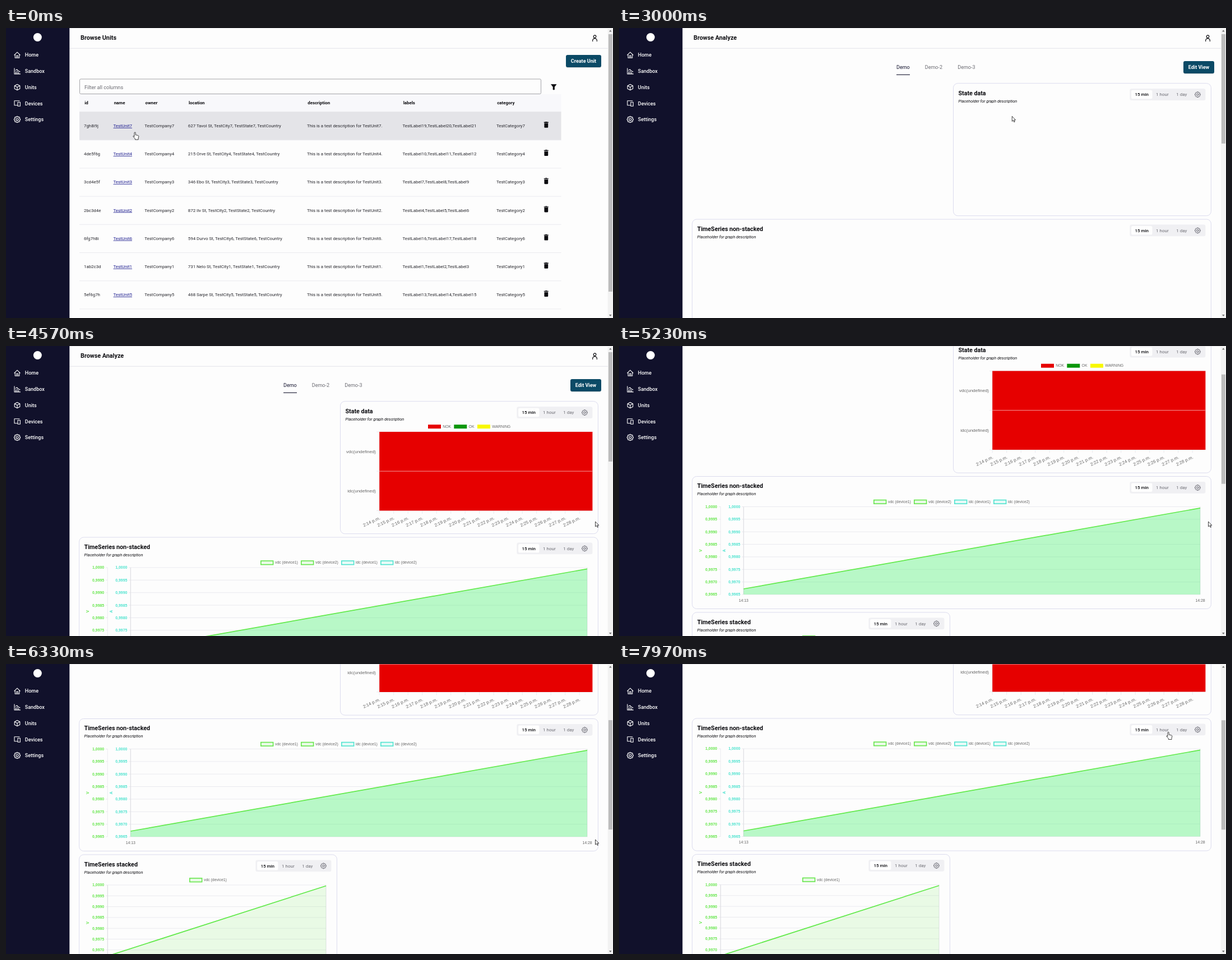
Recreate the animation shown at these times as an HTML page. Size 1083 by 517 pixels, loop 8000 ms.

```html
<!DOCTYPE html>
<html lang="en">
<head>
<meta charset="utf-8">
<title>Unit dashboard</title>
<style>
html, body { margin: 0; width: 100%; height: 100%; overflow: hidden; background: #fdfdfd; }
svg { display: block; width: 100vw; height: 100vh; font-family: Roboto, sans-serif; }
.chart { font-family: "Liberation Sans", Arial, sans-serif; }
</style>
</head>
<body>
<svg id="stage" viewBox="0 0 1083 517"></svg>
<script>
const INK = '#0c0c10', NAVY = '#11112b', GRAY = '#6b6b72', RULE = '#e2e2ea', EDGE = '#d3d4ea';
const GREEN = '#66e64c', TEAL = '#4fe3cf', LOOP = 8000;
const range = n => [...Array(n).keys()];

// y is the vertical middle of the capitals
const text = (x, y, str, size = 9, attrs = '') =>
  `<text x="${x}" y="${(y + size * .356).toFixed(2)}" font-size="${size}" ${attrs}>${str}</text>`;
const bold = (x, y, str, size = 10.8) => text(x, y, str, size, `font-weight="700" fill="${INK}"`);
const rect = (x, y, x2, y2, fill, attrs = '') =>
  `<rect x="${x}" y="${y}" width="${x2 - x}" height="${y2 - y}" fill="${fill}" ${attrs}/>`;
const line = (x, y, x2, y2, color = RULE, w = .7) =>
  `<path d="M${x} ${y}L${x2} ${y2}" stroke="${color}" stroke-width="${w}"/>`;
const icon = (x, y, d, color, w = 1.2) =>
  `<path transform="translate(${x} ${y})" d="${d}" fill="none" stroke="${color}" stroke-width="${w}" stroke-linejoin="round" stroke-linecap="round"/>`;
const card = (x, y, x2, y2) => rect(x, y, x2, y2, 'none', `rx="8" stroke="${EDGE}" stroke-width=".8"`);
const button = (x, y, x2, y2, str, fill) =>
  rect(x, y + .8, x2, y2 + 1, '#000', 'rx="3.5" opacity=".15"') + rect(x, y, x2, y2, fill, 'rx="3"') +
  text((x + x2) / 2, (y + y2) / 2, str, 9, 'font-weight="700" fill="#fff" text-anchor="middle"');

function gear(x, y, r, color, w) {
  const pts = range(8).flatMap(i => [[-.3, .78], [-.19, 1], [.19, 1], [.3, .78]].map(([a, k]) => {
    const t = i * Math.PI / 4 + a;
    return `${(Math.cos(t) * r * k).toFixed(2)} ${(Math.sin(t) * r * k).toFixed(2)}`;
  }));
  const c = r * .36;
  return icon(x, y, `M${pts.join('L')}ZM${c} 0A${c} ${c} 0 1 1 ${-c} 0A${c} ${c} 0 1 1 ${c} 0`, color, w);
}

function header(title, userX) {
  return bold(133, 17.5, title) + line(113, 36.3, 1083, 36.3, '#dfdfe6', .8) +
    icon(userX, 18, 'M-2.3 -2.8a2.3 2.3 0 1 1 4.6 0a2.3 2.3 0 1 1 -4.6 0M-3.8 5.6V4.2A3.8 3.6 0 0 1 3.8 4.2V5.6', INK);
}

function sidebar() {
  const items = [
    ['Home', 'M-5.2 0L0 -5L5.2 0M-3.8 -1V5H3.8V-1M-1.2 5V1.2H1.2V5'],
    ['Sandbox', 'M-5 -5V5H5.5M-2.5 5V1M0 5V0M2.5 5V2M-3 -1.5L-.5 -3L2 -.5L5 1'],
    ['Units', 'M0 -5.2L4.8 -2.6V2.6L0 5.2L-4.8 2.6V-2.6ZM-4.8 -2.6L0 0L4.8 -2.6M0 0V5.2'],
    ['Devices', 'M4 -4.5H-5V3.5H0M1 -2H5.3V5H1Z'],
    ['Settings']
  ];
  return rect(0, 0, 113.3, 517, NAVY) + '<circle cx="56.3" cy="16.5" r="7.5" fill="#fff"/>' +
    items.map(([name, d], i) => {
      const y = 48.2 + i * 28.7;
      return (d ? icon(20, y, d, '#fff', 1.1) : gear(20, y, 5.6, '#fff', 1.1)) +
        text(33.8, y, name, 9, 'font-weight="500" fill="#fff"');
    }).join('');
}

function browsePage() {
  const cols = [[139, 'id'], [191.5, 'name'], [247.3, 'owner'], [324.8, 'location'],
    [537, 'description'], [707.5, 'labels'], [875, 'category']];
  const rows = [
    [7, '7gh8i9j', '627 Tavol St'], [4, '4de5f6g', '215 Orve St'], [3, '3cd4e5f', '346 Ebo St'],
    [2, '2bc3d4e', '872 Ilv St'], [6, '6fg7h8i', '594 Durvo St'], [1, '1ab2c3d', '731 Nelo St'],
    [5, '5ef6g7h', '468 Sarpe St']];
  const labels = n => [2, 1, 0].map(k => 'TestLabel' + (n * 3 - k)).join(',');
  const row = ([n, id, street], i) => {
    const y = 149.5 + i * 50.2, mid = y + 24.6;
    const cells = [id, 'TestUnit' + n, 'TestCompany' + n,
      `${street}, TestCity${n}, TestState${n}, TestCountry`,
      `This is a test description for TestUnit${n}.`, labels(n), 'TestCategory' + n];
    return (i ? '' : rect(131, y, 990.5, y + 50, '#e4e4e8')) + line(131, y + 50.2, 990.5, y + 50.2) +
      cells.map((c, k) => text(cols[k][0], mid, c, 7.87,
        k === 1 ? 'fill="#1b1b8e" text-decoration="underline"' : 'fill="#26262c"')).join('') +
      `<path transform="translate(963.8 ${mid - 1.7})" d="M-4 -4.8H-2L-1.3 -5.5H1.3L2 -4.8H4V-3.5H-4ZM-3.4 -2.9H3.4V4.3Q3.4 5.4 2.3 5.4H-2.3Q-3.4 5.4 -3.4 4.3Z" fill="${INK}"/>`;
  };
  return header('Browse Units', 1050.5) + button(999, 48, 1062, 70, 'Create Unit', '#0b4a66') +
    rect(131.5, 91, 954.5, 117.5, '#fdfdfd', 'rx="2" stroke="#8d8d94" stroke-width=".8"') +
    text(140, 105.8, 'Filter all columns', 9.1, `fill="${GRAY}"`) +
    `<path d="M972.5 100.5H982L978.6 105V110H976V105Z" fill="${INK}" stroke="${INK}" stroke-linejoin="round" stroke-width=".6"/>` +
    rect(131, 118, 990.5, 149.5, '#f8f8fb') + line(131, 149.5, 990.5, 149.5) +
    cols.map(([x, name]) => text(x + 1.2, 132.8, name, 7.9, `font-weight="600" fill="${INK}"`)).join('') +
    rows.map(row).join('');
}

function detailsPage() {
  const section = (y, name) => bold(145, y, name) + line(145, y + 11, 581, y + 11);
  const field = (x, y, name, value) =>
    rect(x, y, x + 214, y + 39.2, 'none', `rx="2" stroke="${RULE}" stroke-width=".8"`) +
    bold(x + 5.3, y + 11.4, name, 9) + text(x + 5.3, y + 27, value, 9, 'fill="#1d1d22"');
  const link = (y, str) => text(613.4, y, str, 9, 'fill="#4763a6"');
  return header('Unit Details', 1060.3) + gear(151, 74, 6.8, INK, 1.3) +
    card(134, 96, 592, 468.3) + bold(142.8, 112.8, 'Unit Metadata') +
    section(140.5, 'Unit Information') +
    field(145.2, 159, 'Unit Name', 'TestUnit7') + field(366.3, 159, 'Unit ID', '7gh8i9j') +
    field(145.2, 205.2, 'Owner', 'TestCompany7') +
    field(366.3, 205.2, 'Description', 'This is a test description for TestUnit7.') +
    field(145.2, 251.4, 'Category', 'TestCategory7') +
    section(316.3, 'Location') +
    field(145.2, 334.4, 'Location', '627 Tavol St, TestCity7, TestState7, TestCountry') +
    section(399.3, 'Labels') + field(145.2, 417.6, 'Labels', 'TestLabel19,TestLabel20,TestLabel21') +
    card(604, 96, 1062.3, 230) + bold(613, 112.8, 'Views') +
    button(626, 130.7, 668.2, 153, 'Demo', NAVY) +
    button(622, 160, 672.4, 182.3, 'Demo-2', NAVY) + button(622, 189.2, 672.4, 211.5, 'Demo-3', NAVY) +
    card(604, 251, 1062.3, 313) + bold(613, 268, 'Devices') +
    link(283, 'device1 (ID: iBX4WfJxhoyk7JGBFPEi)') + link(296.5, 'device2 (ID: iBX4WfJxhoyk7JGBFPEb)');
}

function chartCard(x, y, x2, title) {
  const r = x2 - 10, tab = (dx, str, c) => text(r - dx, y + 19.8, str, 8, `text-anchor="middle" ${c}`);
  return card(x, y, x2, y + 236) + bold(x + 9, y + 17, title, 10.7) +
    text(x + 9, y + 31.2, 'Placeholder for graph description', 7.3, `font-style="italic" fill="${INK}"`) +
    rect(r - 135, y + 9.5, r, y + 30.3, '#f0f0f3', 'rx="3"') +
    rect(r - 132.3, y + 12, r - 95, y + 27.5, '#fefefe', 'rx="2.5"') +
    tab(113.7, '15 min', `font-weight="500" fill="${INK}"`) +
    tab(77, '1 hour', `fill="${GRAY}"`) + tab(42.7, '1 day', `fill="${GRAY}"`) +
    gear(r - 14, y + 20, 4.9, '#55555f', .9);
}

const legendText = (x, y, str) => text(x, y, str, 6.87, 'fill="#666"');
const legendBox = (x, y, color, str) =>
  rect(x + .8, y - 2.9, x + 22.6, y + 3.7, color, `fill-opacity=".13" stroke="${color}" stroke-width="1.6"`) +
  legendText(x + 26, y, str);

function statePlot() {
  const top = 153, ticks = range(15).map(i => 666.2 + i * 25.5);
  return [[753, '#e60000', 'NOK'], [799.3, '#0b960b', 'OK'], [841, '#f8f800', 'WARNING']]
    .map(([x, c, s]) => rect(x, 140.2, x + 23, 147.2, c) + legendText(x + 26.3, 143.5, s)).join('') +
    ticks.map(x => line(x, top, x, 299)).join('') +
    [153, 223.2, 293.5].map(y => line(661, y, 1046.5, y)).join('') +
    ['vdc', 'idc'].map((s, i) => text(660, 188 + i * 70.3, s + '(undefined)', 8, 'fill="#666" text-anchor="end"')).join('') +
    ticks.map((x, i) => `<text transform="translate(${x + 2} 308.5) rotate(-25)" font-size="7.9" fill="#666" text-anchor="end">2:${14 + i} p.m.</text>`).join('') +
    `<rect id="bars" x="666.2" y="${top}" fill="#e60000"/><path id="gap" stroke="#f6c4c4" stroke-width=".8"/>`;
}

function axis(right, top, step, color, unit, unitX) {
  const mid = top + step * 3.5;
  return range(8).map(i => text(right, top + i * step, (1 - i * .0005).toFixed(4).replace('.', ','), 6.9,
    `font-weight="700" fill="${color}" text-anchor="end"`) +
    line(right + 2.5, top + i * step, right + 6, top + i * step)).join('') +
    line(right + 6, top, right + 6, top + step * 7) +
    `<text transform="translate(${unitX} ${mid}) rotate(-90)" font-size="6.9" font-weight="700" fill="${color}" text-anchor="middle">${unit}</text>`;
}

const grid = (x, x2, top, step) => range(8).map(i => line(x, top + i * step, x2, top + i * step)).join('') +
  [x, x2].map(v => line(v, top, v, top + step * 7, '#d6d6dc')).join('');
const times = (x, x2, y) => [[x, '14:13'], [x2, '14:28']]
  .map(([v, s]) => text(v, y, s, 6.9, 'fill="#666" text-anchor="middle"')).join('');
const series = (id, fill) =>
  `<path id="${id}Fill" fill="${fill}"/><path id="${id}Line" fill="none" stroke="#62ea4b" stroke-width="1.7"/>`;

function analyzePage() {
  const tabs = [[495, 'Demo', '#14142e'], [545.8, 'Demo-2', GRAY], [604.3, 'Demo-3', GRAY]];
  const names = ['vdc (device1)', 'vdc (device2)', 'idc (device1)', 'idc (device2)'];
  return header('Browse Analyze', 1050.5) + button(1007, 59, 1062, 81, 'Edit View', '#0b4a66') +
    tabs.map(([x, s, c]) => text(x, 70, s, 9, `fill="${c}"`)).join('') + line(495, 83.3, 519, 83.3, NAVY, 1.1) +
    chartCard(596.5, 98.7, 1056.4, 'State data') +
    chartCard(130.6, 341, 1056.4, 'TimeSeries non-stacked') +
    chartCard(130.6, 583.4, 590.4, 'TimeSeries stacked') +
    `<g id="plots" class="chart">` + statePlot() +
    [454, 526, 598, 668].map((x, i) => legendBox(x, 386, i < 2 ? GREEN : TEAL, names[i])).join('') +
    axis(175.2, 395, 22.36, GREEN, 'V', 148) + axis(216.3, 395, 22.36, TEAL, 'A', 189.5) +
    grid(222.3, 1037, 395, 22.36) + times(222.3, 1037, 561.6) + series('wide', 'rgba(72,240,110,.38)') +
    legendBox(327, 628.3, GREEN, names[0]) + axis(175.2, 637.5, 19.3, GREEN, 'V', 148) +
    grid(181.3, 571, 637.5, 19.3) + times(181.3, 571, 783) + series('half', 'rgba(100,230,70,.13)') + '</g>';
}

const scrollbar = () => rect(1073.7, 0, 1083, 517, '#f2f2f2') +
  '<path d="M1076 6.5L1078.3 3.5L1080.6 6.5ZM1076 511L1078.3 514L1080.6 511Z" fill="#6e6e6e"/>' +
  '<rect id="thumb" x="1074.9" width="7" fill="#bcbcbc"/>';

document.getElementById('stage').innerHTML = rect(0, 0, 1083, 517, '#fdfdfd') +
  `<g id="browse">${browsePage()}</g><g id="details">${detailsPage()}</g><g id="analyze">${analyzePage()}</g>` +
  line(113, .3, 1083, .3, '#d4d4d8') + sidebar() + `<g id="bar">${scrollbar()}</g>` +
  '<g id="pointer" stroke="#111" stroke-width=".8" stroke-linejoin="round" fill="#fff">' +
  '<path id="arrow" d="M0 0V9L2.1 7.1L3.5 10.3L5 9.7L3.6 6.6H6.3Z"/>' +
  '<path id="hand" d="M-1 1a1.1 1.1 0 0 1 2.2 0V4.6L5.6 5.5Q7 6 6.8 7.4L6 11V13H.4V11.4L-3 7.6Q-3.4 6.2 -2.2 6.4L-1 7.6Z"/></g>';

const $ = Object.fromEntries([...document.querySelectorAll('[id]')].map(e => [e.id, e]));
const show = (el, on) => el.setAttribute('display', on ? 'inline' : 'none');
const set = (el, attrs) => Object.entries(attrs).forEach(([k, v]) => el.setAttribute(k, v));

const PATH = [[0, 230, 186], [300, 214, 176], [850, 214, 176], [1500, 611, 91.5], [1700, 611, 91.5],
  [2150, 654, 147], [2800, 654, 147], [3600, 954, 213], [3720, 954, 213], [4180, 1051.5, 313],
  [6800, 1051.5, 313], [7450, 980, 121.5], [LOOP, 980, 121.5]];
const SCROLL = [[0, 0], [4700, 0], [5150, 108.5], [5320, 108.5], [5900, 243.5], [6400, 243.5], [6600, 244], [LOOP, 244]];

function at(keys, t, k = 1) {
  const i = Math.max(1, keys.findIndex(key => key[0] >= t));
  const a = keys[i - 1], b = keys[i], u = (t - a[0]) / (b[0] - a[0]);
  return a[k] + (b[k] - a[k]) * u * u * (3 - 2 * u);
}

function drawSeries(id, x, x2, base, y, y2, p) {
  const grow = v => base + (v - base) * p;
  const d = `M${x} ${grow(y)}L${x2} ${grow(y2)}`;
  $[id + 'Line'].setAttribute('d', d);
  $[id + 'Fill'].setAttribute('d', `${d}V${base}H${x}Z`);
}

function render(t) {
  const page = t < 600 ? 'browse' : t < 2680 ? 'details' : 'analyze';
  ['browse', 'details', 'analyze'].forEach(id => show($[id], id === page));
  show($.bar, page !== 'details');

  const scroll = at(SCROLL, t);
  set($.analyze, { transform: `translate(0 ${-scroll})` });
  set($.thumb, { y: 11 + scroll * .366, height: page === 'browse' ? 459 : 195 });

  // charts grow with a quartic ease-out over one second
  const u = Math.min(1, Math.max(0, (t - 3245) / 1000)), p = 1 - (1 - u) ** 4;
  show($.plots, t >= 3245);
  set($.bars, { width: 380.2 * p, height: 140.5 * p });
  set($.gap, { d: `M666.2 ${153 + 70.2 * p}H${666.2 + 380.2 * p}` });
  drawSeries('wide', 222.3, 1037, 551.5, 541.5, 397.4, p);
  drawSeries('half', 181.3, 571, 772.6, 764.1, 639, p);

  const hand = t < 600 || (t > 1990 && t < 2680) || t > 7400;
  show($.hand, hand);
  show($.arrow, !hand);
  set($.pointer, { transform: `translate(${at(PATH, t)} ${at(PATH, t, 2)})` });
}

function tick() {
  render(performance.now() % LOOP);
  requestAnimationFrame(tick);
}
tick();
</script>
</body>
</html>
```
